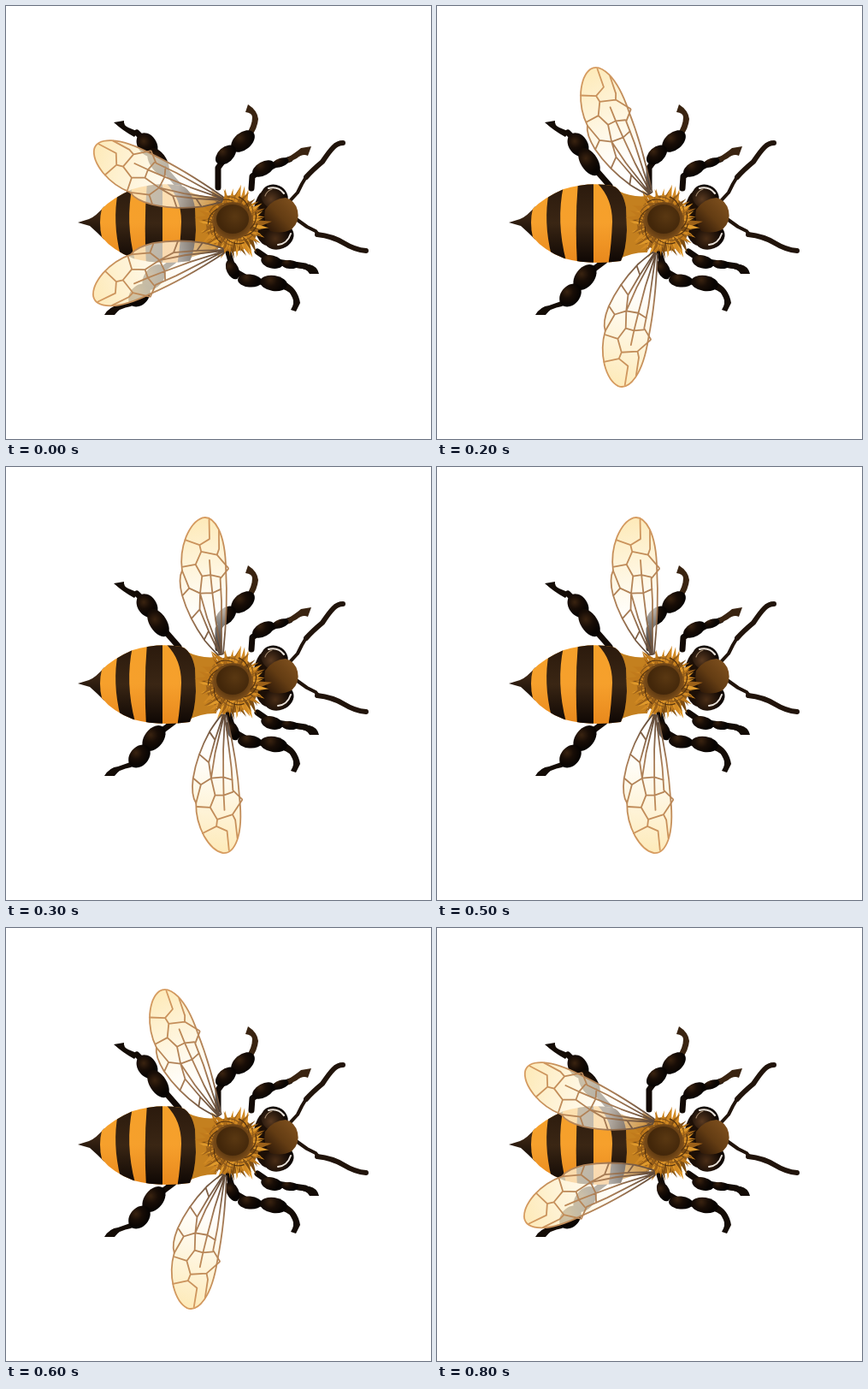
Recreate the animation shown at these times as an HTML page with a canvas. Size 497 px wide and 506 px high, loop 900 ms.

```html
<!DOCTYPE html>
<html lang="en">
<head>
<meta charset="utf-8">
<title>Bee</title>
<style>
html, body { margin: 0; width: 100%; height: 100%; overflow: hidden; background: #fff; }
canvas { display: block; }
</style>
</head>
<body>
<canvas id="stage" width="497" height="506"></canvas>
<script>
const ctx = document.getElementById('stage').getContext('2d');
const STEP = 100, STEPS = 9;

// Wing poses from folded back to swept forward: [root x, root y, degrees].
const UPPER = [[253, 226, -75], [249, 221, -55], [249, 219, -32], [251, 219, -14], [252, 220, 0]];
const LOWER = [[254, 286, -77], [254, 289, -46], [255, 289, -22], [255, 290, -7], [256, 289, 6]];

const wingShape = new Path2D('M3 0Q22-52 30-95Q37-125 33-143Q29-160 18-160Q6-159-6-143' +
  'Q-18-126-20-106Q-27-98-27-78Q-26-50-14-20Q-8-8-3 0Z');
const wingVeins = new Path2D('M1 0L16-60L21-86L33-95M-8-140L7-130L20-134L25-156' +
  'M7-130L7-122L24-114L33-96M24-114L28-120L33-141M7-122L-3-109L-18-110M-3-109L1-94L11-93L14-110' +
  'M11-93L21-88M1-94L-6-75L-17-84L-26-78M-17-84L-20-106M-6-75L8-72L11-93M8-72L19-74' +
  'M8-72L4-40L1 0M-6-75L-5-45L0 0M-23-49L-11-57L-6-75M-11-57L-7-30L-1 0M-14-22L-7-30');

const abdomen = new Path2D('M112 237Q125 224 148 214Q178 205 205 210Q217 214 221 235L222 262' +
  'Q221 286 215 298Q178 303 149 295Q125 286 112 270Q108 253 112 237Z');
const stinger = new Path2D('M115 234Q105 246 97 249L84 253L98 257Q106 264 115 273Q109 253 115 234Z');
const stripes = [
  'M131 217Q124 252 134 292L151 298Q139 252 148 210Z',
  'M165 206Q161 252 164 302L183 304Q183 252 183 204Z',
  'M184 204Q205 222 205 252Q204 280 200 304L226 300V225L208 206Z'
].map(d => new Path2D(d));

// Leg segments: centre, half length, half width, degrees.
const segments = [
  [165, 162, 15, 11, 55], [178, 182, 18, 10, 58],
  [173, 317, 17, 11, 128], [156, 338, 15, 11, 130],
  [277, 158, 16, 10, -40], [257, 174, 14, 9, -42],
  [321, 183, 10, 5, -18], [301, 190, 14, 8, -28],
  [311, 299, 13, 7.5, 14], [332, 302, 10, 5, 5],
  [265, 308, 12, 7, 65], [285, 321, 14, 7.5, 5], [313, 324, 16, 9, 8]
];
const joints = [
  'M181 186L202 210M153 148L165 160', 'M176 313L196 298M147 347L158 337',
  'M262 170L248 189L248 212M270 164L285 150', 'M306 187L288 199L287 213M293 196L318 184L332 179',
  'M294 287L310 298L350 304', 'M260 288L266 309L285 320L327 327'
].map(d => new Path2D(d));
const feet = [
  'M126 136L138 134Q137 139 143 142L155 147L150 153Q137 146 126 136Z',
  'M148 344L146 351Q132 353 127 361L115 361Q121 351 131 350Z',
  'M283 115Q294 122 295 132Q294 143 287 152L281 150Q288 139 288 130Q288 125 280 124Z',
  'M357 164L353 175Q347 172 340 178L330 183L328 178Q339 171 345 166Z',
  'M340 301L355 302Q364 304 366 313L355 313Q353 307 340 306Z',
  'M325 322Q341 329 344 347L339 357L333 355Q338 347 335 341Q332 333 324 331Z'
].map(d => new Path2D(d));
const antennae = [
  ['M329 231L341 218L346 208L352 198', 4], ['M351 200Q358 192 370 182Q378 170 383 165Q388 160 394 160', 6],
  ['M338 248L352 258L362 263L366 268', 4], ['M364 267Q382 269 395 277Q408 285 421 286', 6]
];

function gradient(g, colors) {
  colors.forEach((c, i) => g.addColorStop(i / (colors.length - 1), c));
  return g;
}

function linear(x0, y0, x1, y1, ...colors) {
  return gradient(ctx.createLinearGradient(x0, y0, x1, y1), colors);
}

function radial(x, y, r, ...colors) {
  return gradient(ctx.createRadialGradient(x, y, 0, x, y, r), colors);
}

function fill(path, style) {
  ctx.fillStyle = style;
  ctx.fill(path);
}

function stroke(path, style, width) {
  ctx.strokeStyle = style;
  ctx.lineWidth = width;
  ctx.stroke(path);
}

function ellipse(x, y, rx, ry, deg, style) {
  ctx.beginPath();
  ctx.ellipse(x, y, rx, ry, deg * Math.PI / 180, 0, Math.PI * 2);
  ctx.fillStyle = style;
  ctx.fill();
}

function seeded(seed) {
  return () => (seed = (seed * 16807) % 2147483647) / 2147483647;
}

function drawLegs() {
  joints.forEach(p => stroke(p, '#120a05', 7));
  feet.forEach((p, i) => fill(p, i > 1 && i < 4 ? '#3a2411' : '#140c06'));
  for (const [x, y, rx, ry, deg] of segments) {
    ellipse(x, y, rx, ry, deg, radial(x - 4, y - 4, rx, '#3a2310', '#180d06', '#080402'));
  }
}

function drawAbdomen() {
  fill(new Path2D('M212 216Q228 224 246 222V288Q230 287 212 296Z'), '#c4801f');
  fill(stinger, linear(0, 234, 0, 273, '#4a301a', '#120a05'));
  ctx.save();
  ctx.clip(abdomen);
  ctx.fillStyle = linear(0, 208, 0, 300, '#f5a02a', '#f6a02c', '#e8891d');
  ctx.fillRect(100, 200, 130, 106);
  const dark = linear(0, 208, 0, 300, '#2b1a0d', '#3a2614', '#0e0704');
  stripes.forEach(p => fill(p, dark));
  ctx.restore();
}

function drawThorax() {
  const rnd = seeded(41), cx = 265, cy = 254, count = 150;
  const tones = ['#c07a1c', '#e09a2c', '#7c4c13', '#d28a24', '#9c6119'];
  ellipse(cx, cy, 31, 33, 0, '#99601a');
  for (let i = 0; i < count; i++) {
    const a = i * 2.39996;
    const r = 50 - 22 * i / count - rnd() * 7;
    const lean = a + (rnd() - 0.5) * 0.4;
    const at = (ang, d) => [cx + Math.cos(ang) * d * 0.92, cy + Math.sin(ang) * d];
    ctx.beginPath();
    ctx.moveTo(...at(a - 0.15, r - 24));
    ctx.lineTo(...at(a - 0.1, r - 15));
    ctx.lineTo(...at(lean, r));
    ctx.lineTo(...at(a + 0.1, r - 15));
    ctx.lineTo(...at(a + 0.15, r - 24));
    ctx.fillStyle = tones[Math.floor(rnd() * tones.length)];
    ctx.fill();
  }
  ellipse(265, 251, 24, 22, 0, radial(265, 250, 24, '#4a2c0c', '#4d2e0d', '#80501a'));
  for (let i = 0; i < 13; i++) {
    const a = i * Math.PI * 2 / 13;
    ctx.beginPath();
    ctx.ellipse(265 + Math.cos(a) * 6, 251 + Math.sin(a) * 6, 23, 19, a, 0.2, 1.2);
    ctx.strokeStyle = i % 2 ? '#8a581b' : '#553410';
    ctx.lineWidth = 1.2;
    ctx.stroke();
  }
  ellipse(265, 249, 19, 17, 0, radial(268, 246, 19, '#5a3812', '#43270a'));
}

function drawHead() {
  ellipse(306, 247, 17, 33, 0, '#1c0f06');
  ellipse(314, 223, 16, 14, 25, radial(310, 226, 17, '#5a3a20', '#100804'));
  ellipse(319, 270, 18, 14, -22, radial(315, 272, 17, '#4a2d16', '#100804'));
  fill(new Path2D('M303 238Q312 225 327 224Q338 227 341 239Q344 252 334 261Q322 267 309 263Q300 251 303 238Z'),
    linear(304, 262, 338, 230, '#2a1607', '#633c13', '#7d4f1d'));
  stroke(new Path2D('M307 213Q318 210 325 219'), '#e9e2da', 2.2);
  stroke(new Path2D('M303 222Q305 216 311 214'), '#a1876c', 1.2);
  stroke(new Path2D('M318 279Q329 278 333 266'), '#e9e2da', 2);
}

function drawWing([x, y, deg], flip) {
  ctx.save();
  ctx.translate(x, y);
  ctx.scale(1, flip);
  ctx.rotate(deg * Math.PI / 180);
  fill(wingShape, linear(10, -160, 0, 0, 'rgba(253,230,172,.84)', 'rgba(254,241,208,.78)',
    'rgba(255,253,247,.68)', 'rgba(255,255,255,.1)'));
  const vein = linear(10, -160, 0, 0, '#d79c60', '#be8a58', '#a67b55', '#5f4a3a');
  stroke(wingVeins, vein, 1.8);
  stroke(wingShape, vein, 1.8);
  ctx.restore();
}

function draw(time) {
  const step = Math.floor(time / STEP) % STEPS;
  const pose = Math.min(step, STEPS - 1 - step);
  ctx.fillStyle = '#fff';
  ctx.fillRect(0, 0, 497, 506);
  ctx.lineCap = ctx.lineJoin = 'round';
  drawLegs();
  drawAbdomen();
  antennae.forEach(([d, w]) => stroke(new Path2D(d), '#21140b', w));
  drawHead();
  drawThorax();
  drawWing(UPPER[pose], 1);
  drawWing(LOWER[pose], -1);
}

const start = performance.now();
function tick() {
  draw(performance.now() - start);
  requestAnimationFrame(tick);
}
tick();
</script>
</body>
</html>
```
